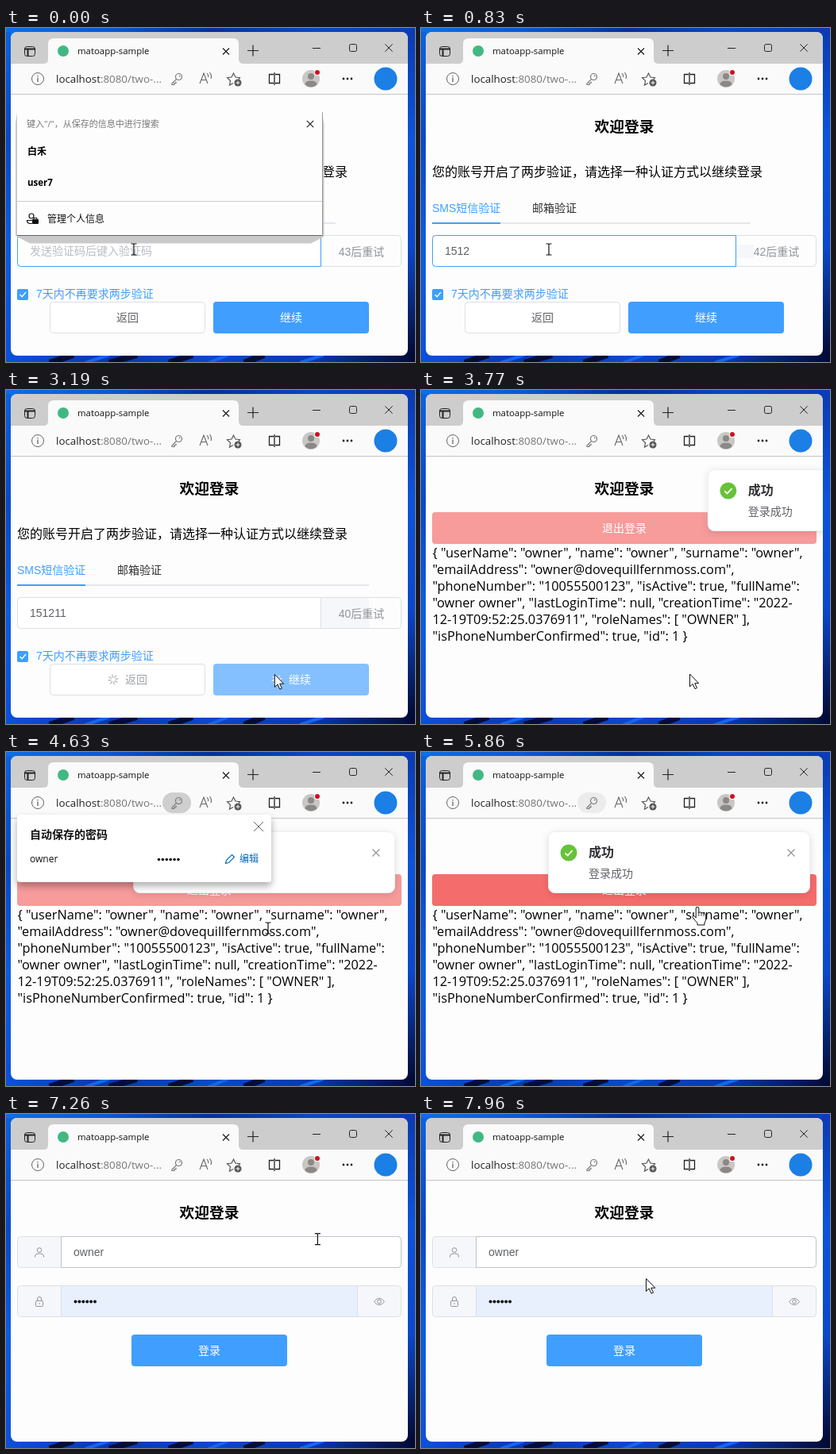
An HTML page that plays this animation: 515 by 421 pixels, repeating every 8000 ms.

```html
<!DOCTYPE html>
<html lang="zh">
<head>
<meta charset="utf-8">
<title>Two-step sign-in</title>
<style>
html, body { margin: 0; width: 100%; height: 100%; overflow: hidden; background: #0a3aa8; }
svg { display: block; width: 515px; height: 421px; }
text { white-space: pre; }
.form { font-family: "Liberation Sans", "Noto Sans CJK SC", "Noto Sans CJK", sans-serif; }
.ui { font-family: "Open Sans", "Noto Sans CJK SC", "Noto Sans CJK", sans-serif; }
</style>
</head>
<body>
<script>
const LOOP = 8000;
const BLUE = '#409eff', EDGE = '#dcdfe6', PALE = '#f5f7fa', GREY = '#606266', MUTED = '#909399';

// ---- markup helpers ----
const attrs = o => Object.entries(o).map(([k, v]) => `${k}="${v}"`).join(' ');
const rect = (x, y, w, h, fill, o = {}) =>
  `<rect x="${x}" y="${y}" width="${w}" height="${h}" fill="${fill}" ${attrs(o)}/>`;
const box = (x, y, w, h, fill, stroke, o = {}) =>
  rect(x + .5, y + .5, w - 1, h - 1, fill, { stroke, rx: 4, ...o });
const circle = (x, y, r, fill, o = {}) => `<circle cx="${x}" cy="${y}" r="${r}" fill="${fill}" ${attrs(o)}/>`;
const line = (d, stroke, o = {}) => `<path d="${d}" fill="none" stroke="${stroke}" ${attrs(o)}/>`;
const group = (id, body, o = {}) => `<g id="${id}" ${attrs(o)}>${body}</g>`;
// y is the optical middle of the line
const text = (x, y, size, str, fill, o = {}) =>
  `<text x="${x}" y="${y + size * .37}" font-size="${size}" fill="${fill}" ${attrs({ class: 'form', ...o })}>${str}</text>`;
const mid = (x, y, size, str, fill, o = {}) => text(x, y, size, str, fill, { 'text-anchor': 'middle', ...o });
const ui = (x, y, size, str, fill, o = {}) => text(x, y, size, str, fill, { class: 'ui', ...o });
const cross = (x, y, r, color, w = 1) =>
  line(`M${x - r} ${y - r}l${2 * r} ${2 * r}m0 ${-2 * r}l${-2 * r} ${2 * r}`, color, { 'stroke-width': w });
const bold = { 'font-weight': 700 };

const spinner = (id, x, y, color) => group(id, [...Array(8)].map((_, i) =>
  line('M0 -3V-6', color, { transform: `rotate(${i * 45})`, 'stroke-width': 1.2, 'stroke-linecap': 'round' })).join(''),
  { 'data-at': `${x},${y}` });

// ---- scenery ----
const gradient = (id, dir, ...colors) => `<linearGradient id="${id}" ${dir}>` + colors.map((c, i) =>
  `<stop offset="${i / (colors.length - 1)}" stop-color="${c}"/>`).join('') + '</linearGradient>';
const down = 'x1="0" y1="0" x2="0" y2="1"';
const desktop =
  rect(0, 0, 515, 210, 'url(#skyTop)') + rect(0, 210, 515, 211, 'url(#skyBottom)') +
  rect(0, 5, 6, 408, 'url(#skyLeft)') + rect(506, 5, 9, 408, 'url(#skyRight)') +
  line('M55 422L85 412M130 422L165 412M205 422L235 412M300 422L325 412', '#020c3c', { 'stroke-width': 8 }) +
  line('M100 422L130 412M255 422L280 412M370 422L400 412', '#1466ee', { 'stroke-width': 4 });

const chrome =
  rect(6, 5, 500, 60, '#cdcdcd', { rx: 8 }) +
  rect(6, 45, 500, 39, '#fafafa') +
  '<path d="M47 45Q53 45 53 39V20Q53 13 60 13H286Q293 13 293 20V39Q293 45 299 45Z" fill="#fafafa"/>' +
  rect(6, 83, 500, 1, '#c6c6c6') +
  box(23, 23, 14, 13, 'none', '#222', { rx: 3 }) + line('M23 26.5H37M27.5 26V35', '#222', { 'stroke-width': 2 }) +
  circle(72, 29, 7, '#41b883') +
  ui(90, 29, 11.4, 'matoapp-sample', '#111') +
  cross(277, 29.5, 4, '#222', 1.3) +
  line('M304 28.5H318M311 21.5V35.5', '#222', { 'stroke-width': 1.2 }) +
  line('M386 25.5H396', '#222') + box(432, 20, 10, 10, 'none', '#222', { rx: 2 }) + cross(482, 25, 4.7, '#222') +
  circle(40, 64, 7.5, 'none', { stroke: '#666' }) + line('M40 62.5V68M40 60V61.3', '#666', { 'stroke-width': 1.3 }) +
  ui(63, 64, 13.35, 'localhost<tspan fill="#767676">:8080/two-...</tspan>', '#222') +
  rect(197, 51, 36, 26, '#cfcfcf', { rx: 13, id: 'keyGlow' }) +
  circle(217.5, 61.5, 4, 'none', { stroke: '#777', 'stroke-width': 1.2 }) +
  line('M214.6 64.4L209 70V71.5H212V69.5H214V67.5', '#777', { 'stroke-width': 1.2 }) + circle(218.7, 60.3, .9, '#777') +
  line('M244 70L249 57L254 70M246 65.5H252M253 57Q255.5 60 254.5 62M256.5 56Q259.5 60 258 64', '#666', { 'stroke-width': 1.1 }) +
  line('M286 69.5L281.5 72L282.5 66.5L278.5 62.7L284 62L286.5 57L289 62L294.5 62.7L293 64.5', '#555', { 'stroke-width': 1.2 }) +
  circle(292, 69, 4.5, '#555') + line('M289.5 69H294.5M292 66.5V71.5', '#fff') +
  line('M337 58.5H331.5V69.5H337M339 58.5H344.5V69.5H339M338 56V72', '#222', { 'stroke-width': 1.3 }) +
  circle(384, 64, 11, '#c9c7c5') + circle(384, 61, 4, '#8b8886') +
  '<path d="M376.5 71.5Q376.5 66.5 384 66.5T391.5 71.5Q384 77 376.5 71.5Z" fill="#8b8886"/>' +
  circle(392, 56, 4, '#fff') + circle(392, 56, 3, '#d0121f') +
  [425, 430, 435].map(x => circle(x, 64, 1.4, '#222')).join('') +
  circle(478, 64, 14.5, '#1c7fe6');

// ---- pages ----
const heading = mid(256, 124.5, 18.72, '欢迎登录', '#000', bold);

const verifyPage =
  text(14, 181.5, 16, '您的账号开启了两步验证，请选择一种认证方式以继续登录', '#000') +
  rect(14, 245, 401, 2, '#e4e7ed', { id: 'tabLine' }) + rect(14, 245, 86, 2, BLUE) +
  text(14, 227, 14, 'SMS短信验证', BLUE) + text(140, 227, 14, '邮箱验证', '#303133') +
  box(14, 261, 484, 40, '#fdfdfd', EDGE) +
  rect(397, 273, 22, 17, PALE, { id: 'appendTint' }) +
  '<path id="codeBox" d="M396.5 261.5H18.5Q14.5 261.5 14.5 265.5V296.5Q14.5 300.5 18.5 300.5H396.5Z" fill="#fff"/>' +
  text(30, 281, 14, '', '#b9bdc5', { id: 'code' }) +
  mid(447.5, 281.5, 14, '', MUTED, { id: 'retry' }) +
  rect(14, 329, 14, 14, BLUE, { rx: 2 }) + line('M17.5 336L20.2 338.7L25 333', '#fff', { 'stroke-width': 1.3 }) +
  text(38, 335, 14, '7天内不再要求两步验证', BLUE) +
  box(55, 345, 196, 40, '#fff', EDGE) + rect(261, 345, 196, 40, BLUE, { rx: 4, id: 'next' }) +
  group('idleLabels', mid(153, 365, 14, '返回', GREY) + mid(359, 365, 14, '继续', '#fff')) +
  group('busyLabels', spinner('spinA', 135, 365, '#a8abb2') + text(150, 365, 14, '返回', '#a0a3a8') +
    spinner('spinB', 341, 365, '#fff') + text(356, 365, 14, '继续', '#fff'));

const profile = [
  '{ "userName": "owner", "name": "owner", "surname": "owner",',
  '"emailAddress": "owner@dovequillfernmoss.com",',
  '"phoneNumber": "10055500123", "isActive": true, "fullName":',
  '"owner owner", "lastLoginTime": null, "creationTime": "2022-',
  '12-19T09:52:25.0376911", "roleNames": [ "OWNER" ],',
  '"isPhoneNumberConfirmed": true, "id": 1 }'
];
const profilePage =
  rect(14, 154, 484, 40, '#f56c6c', { rx: 4, id: 'logout' }) + mid(256, 174, 14, '退出登录', '#fff') +
  profile.map((s, i) => ui(14.5, 205 + 21 * i, 16.3, s, '#000')).join('');

const loginPage =
  box(14, 154, 484, 40, PALE, EDGE) +
  '<path d="M69.5 154.5H493.5Q497.5 154.5 497.5 158.5V189.5Q497.5 193.5 493.5 193.5H69.5Z" fill="#fff" stroke="#c0c4cc"/>' +
  circle(42, 171.5, 2.8, 'none', { stroke: MUTED }) + line('M36.5 180.5V179Q37 176 40 176H44Q47 176 47.5 179V180.5', MUTED) +
  text(85, 174, 14, 'owner', GREY) +
  box(14, 216, 484, 40, PALE, EDGE) + rect(69.5, 216.5, 373, 39, '#e8f0fe', { stroke: EDGE }) +
  box(37, 235, 10, 8, 'none', MUTED, { rx: 1 }) + line('M39.5 235V233Q39.5 230.5 42 230.5T44.5 233V235M42 238V240', MUTED) +
  [...Array(6)].map((_, i) => circle(87.5 + i * 4.9, 236.5, 2, '#111')).join('') +
  line('M463.5 236.5Q470 228 476.5 236.5Q470 245 463.5 236.5Z', MUTED) + circle(470, 236.5, 2.3, 'none', { stroke: MUTED }) +
  rect(158, 278, 196, 40, BLUE, { rx: 4 }) + mid(256, 298, 14, '登录', '#fff');

// ---- overlays ----
const notice =
  box(160, 100, 330, 78, '#fff', '#ebeef5', { rx: 8, filter: 'url(#soft)' }) +
  circle(186, 127, 10.5, '#67c23a') + line('M181.5 127.5L184.7 130.5L190.5 124.2', '#fff', { 'stroke-width': 1.8 }) +
  text(211, 126, 16, '成功', '#303133', bold) + text(211, 153, 14, '登录成功', GREY) + cross(466, 127, 4.5, MUTED, 1.2);

const suggest =
  '<path d="M12 120V262L30 271.5H384L400.5 263V122L398 106H14Z" fill="#c9c9c9"/>' +
  rect(14, 106, 384, 155, '#fdfdfd') + rect(14, 261, 385, 1, '#666') + rect(398, 106, 1, 156, '#999') +
  ui(26, 121, 11, '键入"/"，从保存的信息中进行搜索', '#767676') + cross(383, 121, 4.2, '#222', 1.2) +
  ui(27, 156, 12, '白禾', '#000', bold) + ui(27, 195, 11.5, 'user7', '#000', bold) +
  rect(14, 218, 384, 1, '#ccc') +
  circle(32, 237, 3, 'none', { stroke: '#111', 'stroke-width': 1.2 }) +
  line('M33 246.5H30Q26.5 246 26.5 242.5H33', '#111', { 'stroke-width': 1.2 }) + rect(33, 241, 8, 6, '#111', { rx: 1 }) +
  line('M35 241V239.5H39V241', '#111') + ui(52, 241, 12, '管理个人信息', '#111');

const saved =
  rect(14, 79, 320, 85, '#fff', { rx: 4, filter: 'url(#deep)' }) +
  ui(30, 104, 14, '自动保存的密码', '#111', bold) + cross(318, 94, 6, '#666') +
  ui(30, 135, 12, 'owner', '#111') +
  [...Array(6)].map((_, i) => circle(192.5 + i * 4.9, 135.5, 1.8, '#111')).join('') +
  line('M276.5 140.5L277.5 136.5L284.5 129.5L287.5 132.5L280.5 139.5Z', '#0067c0', { 'stroke-width': 1.1 }) +
  ui(294, 135, 12, '编辑', '#0067c0');

const ink = { stroke: '#111', 'stroke-width': 1, 'stroke-linejoin': 'round' };
const shape = (d, o) => `<path d="${d}" fill="#fff" ${attrs({ ...ink, ...o })}/>`;
const pointers =
  group('arrow', shape('M.5 .5V16.5L4.2 13L7 19.2L9.5 18.1L6.8 12.2H11.8Z')) +
  group('beam', line('M-3.5 -7H-1Q0 -7 0 -6Q0 -7 1 -7H3.5M0 -6V6M-3.5 7H-1Q0 7 0 6Q0 7 1 7H3.5', '#111', { 'stroke-width': 1.2 })) +
  group('hand', shape('M-1.8 14V2Q-1.8 .3 0 .3T1.8 2V8Q2 6.7 3.5 6.8Q5 7 5 8.5Q5.3 7.5 6.7 7.7Q8 8 8 9.5Q8.5 8.7 9.7 9.1Q10.7 9.5 10.7 11V15.5Q10.5 18 9 20V23H0V20.5Q-3 17.5 -5.8 13.5Q-6.5 12 -5.2 11.3Q-4 10.9 -1.8 14Z') +
    line('M1.8 8V12M5 8.5V12M8 9.5V12', '#111', { 'stroke-width': .8 }));

document.body.innerHTML = `<svg viewBox="0 0 515 421" xmlns="http://www.w3.org/2000/svg">
<defs>
  ${gradient('skyTop', '', '#0b6fe6', '#0a58d6', '#06309a', '#0a48c4', '#0a3cb4')}
  ${gradient('skyBottom', '', '#0b50dc', '#0638b0', '#0a48cc', '#0638b4', '#020a34')}
  ${gradient('skyLeft', down, '#0a62e0', '#0848c8', '#0a5ce4', '#0a50dc')}
  ${gradient('skyRight', down, '#0a3cb4', '#0b54dc', '#0a48cc', '#020a34')}
  <filter id="soft" x="-10%" y="-30%" width="120%" height="160%"><feDropShadow dx="0" dy="2" stdDeviation="5" flood-opacity=".12"/></filter>
  <filter id="deep" x="-10%" y="-30%" width="120%" height="160%"><feDropShadow dx="0" dy="5" stdDeviation="5" flood-opacity=".32"/></filter>
  <clipPath id="frame"><rect x="6" y="5" width="500" height="408" rx="8"/></clipPath>
</defs>
${desktop}
<g clip-path="url(#frame)">
${rect(6, 5, 500, 408, '#fdfdfd')}${heading}
${group('verify', verifyPage)}${group('profile', profilePage)}${group('login', loginPage)}
${group('notice', notice)}${chrome}${group('suggest', suggest)}${group('saved', saved)}
</g>
${group('pointer', pointers)}</svg>`;

// ---- motion ----
const $ = id => document.getElementById(id);
const show = (id, on) => $(id).setAttribute('display', on ? 'inline' : 'none');
const set = (id, key, value) => $(id).setAttribute(key, value);
const clamp = v => Math.max(0, Math.min(1, v));
const ramp = (t, a, b) => clamp((t - a) / (b - a));

// The screen refreshes in bursts: [first, last, count]
const ticks = [[0, 0, 1], [150, 540, 4], [830, 830, 1], [1130, 2050, 8], [2210, 3190, 8], [3340, 4350, 8],
  [4480, 5470, 8], [5620, 6410, 7], [6700, 7670, 8], [7810, 7960, 2]]
  .flatMap(([a, b, n]) => [...Array(n)].map((_, i) => n > 1 ? a + (b - a) * i / (n - 1) : a));
const snap = t => ticks.findLast(k => k <= t + .01);

const route = [[0, 161, 279], [1300, 161, 279], [1900, 337, 358], [3600, 338, 358], [4350, 332, 240], [4620, 330, 222],
  [5000, 338, 320], [5450, 348, 200], [5740, 348, 195], [5900, 348, 195], [6400, 432, 154], [7100, 432, 154],
  [7660, 219, 174], [7950, 283, 207], [LOOP, 283, 207]];
const keyTimes = [150, 400, 535, 830, 1130, 1260];
const looks = [[1600, 'beam'], [2300, 'hand'], [4300, 'arrow'], [5300, 'beam'], [7200, 'hand'], [7800, 'beam'], [LOOP + 1, 'arrow']];

function pointerAt(t) {
  const i = Math.max(1, route.findIndex(p => p[0] >= t));
  const [a, x0, y0] = route[i - 1], [b, x1, y1] = route[i];
  const k = ramp(t, a, b), e = k * k * (3 - 2 * k);
  return [x0 + (x1 - x0) * e, y0 + (y1 - y0) * e];
}

function draw(now) {
  const t = snap(now % LOOP);
  const busy = t >= 2300;
  show('verify', t < 3600);
  show('profile', t >= 3600 && t < 7150);
  show('login', t >= 7150);

  const typed = '151211'.slice(0, keyTimes.filter(k => k <= t).length);
  $('code').textContent = typed || '发送验证码后键入验证码';
  set('code', 'fill', typed ? GREY : '#b9bdc5');
  set('codeBox', 'stroke', busy ? EDGE : BLUE);
  $('retry').textContent = 43 - Math.floor((t + 600) / 1000) + '后重试';
  show('appendTint', t >= 400);
  Object.entries(busy ? { y: 262, width: 60, height: 38 } : { y: 273, width: 22, height: 17 })
    .forEach(([k, v]) => set('appendTint', k, v));
  set('tabLine', 'width', busy ? 443 : 401);
  set('next', 'fill', busy ? '#84c0ff' : t >= 1750 ? '#66b1ff' : BLUE);
  show('idleLabels', !busy);
  show('busyLabels', busy);
  for (const id of ['spinA', 'spinB'])
    set(id, 'transform', `translate(${$(id).dataset.at}) rotate(${t * .18})`);

  show('suggest', t < 150);
  show('saved', t >= 4100 && t < 5620);
  show('keyGlow', t >= 4100 && t < 6200);
  set('keyGlow', 'fill', t < 5620 ? '#cfcfcf' : '#ececec');
  set('logout', 'fill', t < 5000 ? '#f79b9b' : '#f56c6c');

  const slide = 1 - ramp(t, 3550, 3880);
  set('notice', 'transform', `translate(${346 * slide * slide} 0)`);
  set('notice', 'opacity', 1 - ramp(t, 6610, 6750));
  show('notice', t >= 3600 && t < 6750);

  const look = looks.find(l => t < l[0])[1];
  for (const id of ['arrow', 'beam', 'hand']) show(id, id === look);
  set('pointer', 'transform', `translate(${pointerAt(t)})`);
}

const start = performance.now();
function frame() {
  draw(performance.now() - start);
  requestAnimationFrame(frame);
}
frame();
</script>
</body>
</html>
```
